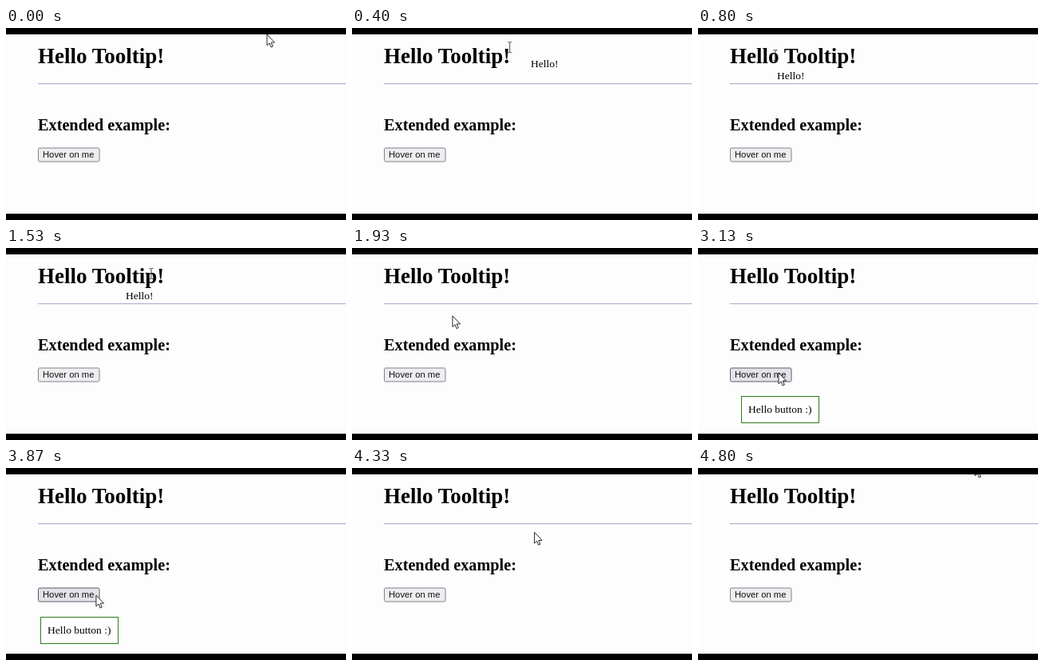
Recreate the animation shown at these times as an HTML page. Size 426 by 240 pixels, loop 4870 ms.

```html
<!DOCTYPE html>
<html lang="en">
<head>
<meta charset="utf-8">
<title>Tooltip</title>
<style>
  html, body { margin: 0; width: 100%; height: 100%; overflow: hidden; background: #000; }
  svg { display: block; width: 100%; height: 100%; }
  text { font-family: "Liberation Serif", "Times New Roman", serif; font-size: 13.5px; fill: #000; }
  .h1 { font-size: 27px; font-weight: bold; }
  .h2 { font-size: 20.25px; font-weight: bold; }
  .label { font-family: "Liberation Sans", Arial, sans-serif; font-size: 11.25px; fill: #111; }
  #button { fill: #eeeef0; stroke: #80808c; }
  #button.hover { fill: #e2e2e8; stroke: #5c5c68; }
</style>
</head>
<body>
<svg viewBox="0 0 426 240">
  <clipPath id="page"><rect y="8" width="426" height="224"/></clipPath>
  <rect width="426" height="240"/>
  <rect y="232" width="426" height="1" fill="#2a2a14"/>
  <g clip-path="url(#page)">
    <rect y="8" width="426" height="224" fill="#fdfdfe"/>
    <text class="h1" x="40" y="44">Hello Tooltip!</text>
    <rect x="40" y="69" width="386" height="1" fill="#b6b4d2"/>
    <rect x="40" y="70" width="386" height="1" fill="#ececf4"/>
    <text class="h2" x="40" y="128">Extended example:</text>
    <rect id="button" x="40.5" y="150" width="76.5" height="17" rx="1.7"/>
    <text class="label" x="46" y="162">Hover on me</text>

    <text id="plainTip" x="-17" y="30">Hello!</text>
    <g id="boxTip">
      <rect x="-48.5" y="29.5" width="97" height="33" fill="#fff" stroke="#2f7c18"/>
      <text x="-40" y="50">Hello button :)</text>
    </g>

    <path id="arrow" d="M0 0V13.8L3.1 10.9 5.1 15.9 7.3 15 5.3 10.1H9.6Z"
          fill="#fff" stroke="#111" stroke-width=".9"/>
    <path id="beam" d="M-2.5-6.5H-.8L0-5.8.8-6.5H2.5M0-5.8V5.8M-2.5 6.5H-.8L0 5.8.8 6.5H2.5"
          fill="none" stroke="#333" stroke-width=".9"/>
  </g>
</svg>
<script>
  const LOOP = 4870, STEP = 200 / 3, LAST = 72, LAG = 2 * STEP;

  // Key points of the pointer's curve: time, x, y
  const path = [
    [0, 327, 8],
    [667, 116, 34], [800, 97, 34],
    [1400, 167, 34], [1533, 182, 32],
    [2400, 69, 142],
    [3000, 103, 156], [3133, 101, 156],
    [3733, 92, 157], [3867, 113, 159],
    [4800, 347, -4]
  ];

  const el = id => document.getElementById(id);
  const [button, plainTip, boxTip, arrow, beam] =
    ["button", "plainTip", "boxTip", "arrow", "beam"].map(el);

  function slope(i, axis) {
    const a = path[Math.max(i - 1, 0)];
    const b = path[Math.min(i + 1, path.length - 1)];
    return (b[axis] - a[axis]) / (b[0] - a[0]);
  }

  // Cubic Hermite curve through the key points
  function pointer(time) {
    const t = Math.max(time, 0);
    let i = 0;
    while (i < path.length - 2 && path[i + 1][0] <= t) i++;
    const a = path[i], b = path[i + 1], d = b[0] - a[0], u = (t - a[0]) / d;
    return [1, 2].map(k =>
      a[k] + (b[k] - a[k]) * u * u * (3 - 2 * u) +
      d * u * (1 - u) * (slope(i, k) * (1 - u) - slope(i + 1, k) * u));
  }

  const inside = ([x, y], l, t, r, b) => x >= l && x <= r && y >= t && y <= b;
  const place = (node, [x, y]) => node.setAttribute("transform", `translate(${x} ${y})`);
  const show = (node, on) => node.style.display = on ? "" : "none";

  function draw(time) {
    const t = Math.min(LAST, Math.floor((time + 4) / STEP)) * STEP;
    const now = pointer(t);
    const late = pointer(t - LAG).map(Math.round); // tooltips trail the pointer
    const onTitle = inside(now, 40, 20, 198, 52);
    const onButton = inside(now, 40, 150, 117, 167);

    show(plainTip, onTitle);
    show(beam, onTitle);
    show(arrow, !onTitle);
    show(boxTip, onButton);
    place(plainTip, late);
    place(boxTip, late);
    place(beam, now);
    place(arrow, now);
    button.classList.toggle("hover", onButton);
  }

  const start = performance.now();
  function tick() {
    draw((performance.now() - start) % LOOP);
    requestAnimationFrame(tick);
  }
  tick();
</script>
</body>
</html>
```
